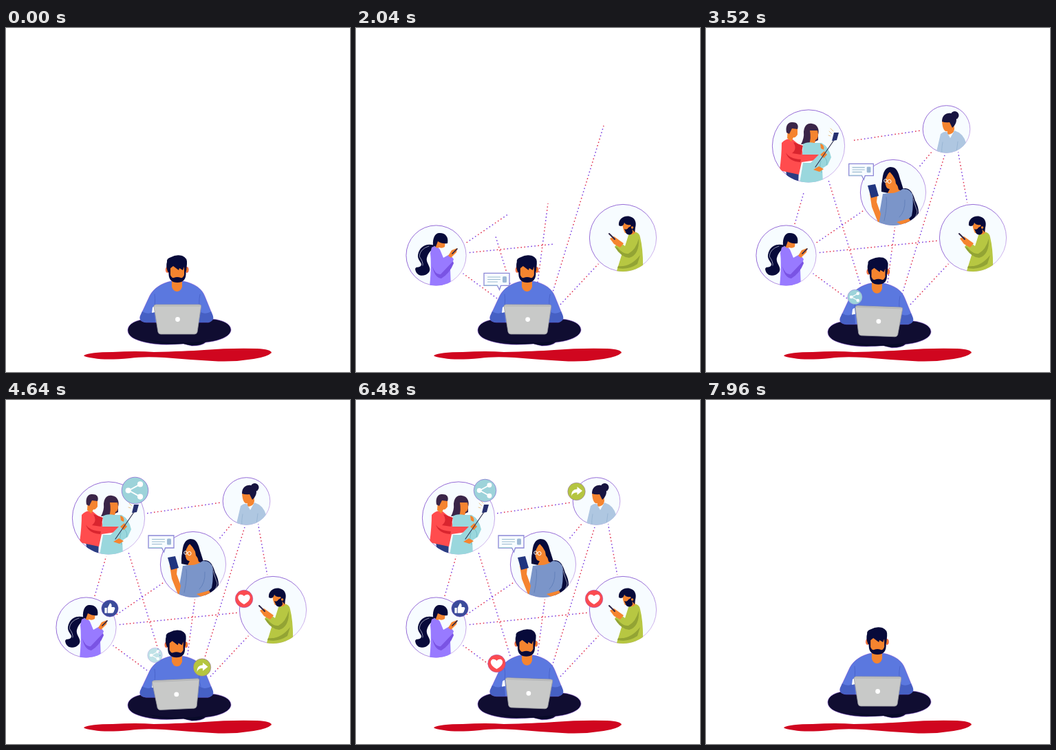
An HTML page that plays this animation: 500x500 px, repeating every 8 s.

```html
<!DOCTYPE html>
<html lang="en">
<head>
<meta charset="utf-8">
<title>Online community</title>
<style>
html, body { margin: 0; width: 100%; height: 100%; overflow: hidden; background: #fff; }
svg { display: block; width: 100vw; height: 100vh; }
</style>
</head>
<body>
<svg id="stage" viewBox="0 0 500 500" xmlns="http://www.w3.org/2000/svg"></svg>
<script>
const LOOP = 8000, OUT = 7600, OUT_END = 7900;
const NAVY = '#070a3a', SKIN = '#f5842f', EDGE = '#7b45cc';
const stage = document.getElementById('stage');

const fill = (d, color, extra = '') => `<path d="${d}" fill="${color}" ${extra}/>`;
const line = (d, color, width = 1) =>
  `<path d="${d}" fill="none" stroke="${color}" stroke-width="${width}" stroke-linecap="round" stroke-linejoin="round"/>`;
const rim = `stroke="${EDGE}" stroke-width=".5"`;

const ponytailWoman =
  fill('M114 316C103 312 92 317 90 330C89 338 98 342 94 346C91 349 88 346 86 350C87 361 99 363 106 355C111 348 101 342 103 334C105 327 109 323 113 320Z', NAVY) +
  line('M106 317Q93 321 92 332Q98 340 97 345', '#e8eefc', .6) +
  fill('M110 319Q117 315 122 322L127 334L136 329L142 336L137 350L138 376H107Q110 345 108 327Z', '#987aff') +
  fill('M111 346Q115 359 123 358L141 339L142 342Q136 357 124 364Q114 363 111 346Z', '#7a54e4') +
  fill('M117 308H130L129 318Q125 321 121 319Q116 321 115 317Z', SKIN) +
  fill('M112 316C111 304 116 297 122 298C130 298 135 304 133 313Q125 314 119 310L116 318Z', NAVY) +
  fill('M134 331L139 323L147 320L146 326L138 334Z', SKIN) +
  line('M140 328L147 321', '#2c2446', 1.7);

const hoodieMan =
  fill('M397 298Q411 293 413 304Q418 324 417 356H378Q383 340 387 327L376 318L382 310L391 317Z', '#b7c742') +
  fill('M411 306Q412 330 397 334Q385 333 376 318L380 319Q388 329 396 328Q407 322 411 306ZM381 346Q399 348 413 330L409 343Q396 352 380 349Z', '#93a434') +
  fill('M387 284L403 281L406 297Q402 303 397 298L391 298Q388 293 387 284Z', SKIN) +
  fill('M382 287C381 278 389 272 398 274C406 276 408 283 406 290L405 297L401 292L399 286Q393 287 390 283Q388 290 382 287Z', NAVY) +
  fill('M390 292Q394 294 396 290L401 287L402 297Q399 303 393 299Z', NAVY) +
  `<circle cx="401.500" cy="290" r="1.700" fill="${SKIN}"/>` +
  fill('M369 306L375 303L389 313L384 319L375 314Z', SKIN) +
  line('M368 299L376 307', '#2c2446', 2);

const selfieCouple =
  fill('M116 207H135L134 226H119Z', '#2b3d82') +
  fill('M110 167Q117 159 126 162L138 172L141 183L166 184L167 191L139 195L135 213L107 207Q110 184 110 167Z', '#ff4c4e') +
  fill('M127 166L141 171L138 184L125 182Q133 176 127 166ZM116 181Q121 190 138 191L137 195Q120 194 116 181Z', '#d9252f') +
  fill('M119 145L133 145L133 155Q130 160 127 159L124 165L118 160Z', SKIN) +
  fill('M117 152C115 141 120 136 126 137C133 137 135 142 133 147L125 146L121 154Z', '#3a2548') +
  fill('M138 169Q143 160 142 151C143 142 147 138 154 139C163 140 165 149 163 155L163 163L152 168Z', '#3a2548') +
  fill('M151 149L162 149Q165 160 159 163L158 168L150 169Q153 160 151 149Z', SKIN) +
  fill('M141 169Q146 165 157 167L168 167Q179 173 182 188L177 199L169 204L170 226H136L141 196H152L164 184L140 184Z', '#9ad7dd') +
  line('M167 193Q164 202 168 210M172 187Q178 194 175 199', '#75bdc6', 1) +
  fill('M166 168Q173 170 171 177L167 175ZM166 184L172 179L176 184L171 189ZM156 206L164 201L171 205L165 209Z', SKIN) +
  line('M159 202L186 163', '#343553', 1.2) +
  fill('M186 152L193 152L190 163L183 164Z', '#26306f') +
  line('M179 150L183 154M181 146L185 150M178 156L181 157', '#e3b36c', .8);

const phoneWoman =
  fill('M285 234C296 230 301 240 304 251C310 262 312 274 302 282L288 287Z', NAVY) +
  line('M299 240Q303 256 307 266Q307 273 301 278', '#f4f7ff', .6) +
  fill('M255 238C257 224 254 204 268 202C279 202 280 213 283 222L288 238L270 241Z', NAVY) +
  fill('M260 221Q262 211 268 209Q275 214 276 226L284 237Q275 243 264 240L267 234Q261 235 260 221Z', SKIN) +
  fill('M267 206Q279 212 280 224L288 238L280 235Q277 219 267 209Q261 215 260 227L262 238L255 237Q254 213 267 206Z', NAVY) +
  fill('M257 241Q264 240 269 240Q277 240 286 234Q297 233 300 243Q302 258 299 273L282 290H248Q253 265 257 241Z', '#7b95c9') +
  line('M262 246Q264 258 259 280M289 250Q290 266 281 275', '#607eb8', .9) +
  fill('M238 241L244 238L249 244L248 253L254 270L251 285L241 260ZM277 282L295 277L298 281L287 288Z', SKIN) +
  fill('M235 229L246 227L251 244L240 247Z', '#20357f') +
  `<g fill="none" stroke="#fff" stroke-width="1"><circle cx="261" cy="222" r="2.300"/><circle cx="266.500" cy="223" r="2.600"/></g>`;

const bunWoman =
  fill('M343 135L360 134L361 147Q360 155 350 155L351 150Q344 152 343 135Z', SKIN) +
  fill('M343 136C343 127 349 123 356 124C365 127 366 135 361 142L358 145L354 137Q348 138 343 136Z', '#171440') +
  `<circle cx="361.500" cy="127" r="6" fill="#171440"/>` +
  fill('M341 154Q346 150 350 151L355 160L361 149Q374 153 378 167L377 184H334Z', '#afc7e1') +
  line('M344 166Q342 177 343 182M366 165L364 181', '#94b1d1', .8);

// cx, cy, radius, pop start, drawing
const people = [
  [116.5, 330.5, 44, 480, ponytailWoman],
  [388, 305, 49, 1220, hoodieMan],
  [149, 171.5, 53, 2040, selfieCouple],
  [272, 239, 48, 2445, phoneWoman],
  [349.5, 147, 34.7, 2950, bunWoman]
];

// x1, y1, x2, y2, grow start, grow end
const links = [
  [205, 393, 130, 338, 120, 520],
  [297, 402, 385, 308, 860, 1240],
  [264, 370, 279, 255, 1200, 1450],
  [285, 387, 360, 142, 1240, 1760],
  [224, 372, 170, 195, 1078, 3462],
  [130, 330, 388, 304, 1640, 2300],
  [140, 326, 272, 236, 1700, 2250],
  [272, 247, 360, 142, 2050, 2500],
  [360, 142, 190, 167, 2433, 3705],
  [361, 150, 384, 278, 2900, 3300],
  [122, 309, 152, 205, 3300, 3630]
];

const disc = (color, glyph) =>
  `<circle r="12.8" fill="${color}" stroke="${EDGE}" stroke-width=".4"/>${glyph}`;
const icons = {
  thumb: disc('#3b4b9b', fill('M-8-1h3.5v8H-8ZM-3.5-1L0-8Q3.5-8 2.5-2H6.5Q8.500-1 7.500 1L5.500 6Q5 7 3 7H-3.500Z', '#fff')),
  heart: disc('#fb4b50', fill('M0 8C-16-1-6-11 0-4C6-11 16-1 0 8Z', '#fff')),
  share: disc('#9dd3da', line('M5-6L-6 0L5 6', '#fff', 1.3) +
    '<g fill="#fff"><circle cx="5" cy="-6" r="2.7"/><circle cx="-6.500" r="2.700"/><circle cx="5" cy="6" r="2.700"/></g>'),
  arrow: disc('#b5c540', fill('M1-7L8.500-1L1 5V1.500Q-5 1-7.500 6.500Q-8-3 1-3.500Z', '#fff')),
  bubble: fill('M-18.500-9H18.500V9H6L4 15L1 9H-18.500Z', '#f7fcff', 'stroke="#8b86d6" stroke-width="1.300"') +
    line('M-13-3.500H5M-13 0H5M-13 3.500H1', '#9bb9cf', 1.1) +
    '<rect x="8.500" y="-4.500" width="6" height="9" rx="1.500" fill="#9db8d6"/>' + line('M-18 8.500H1', '#9ccbd3', 1)
};

// kind, x, y, scale, pop start
const badges = [
  ['bubble', 225.5, 206, 1, 3325],
  ['thumb', 151, 303, .95, 3700],
  ['heart', 346, 289, 1, 4080],
  ['share', 187.5, 131.5, 1.28, 4400],
  ['arrow', 320.5, 133, 1, 5000]
];

// kind, x, start y, scale, rise start
const floats = [
  ['bubble', 204.5, 386, 1, 900],
  ['thumb', 290, 393.5, 1, 2050],
  ['share', 216.5, 394.5, .84, 3330],
  ['arrow', 285, 393, 1, 4400],
  ['heart', 204.5, 393.5, 1, 5900]
];
const LIFE = 1420;

const sleeve = 'M198 412Q207 418 216 411L217 428H204Q193 427 195 419Z';
const worker = `
<g id="worker">
  ${fill('M177 439C178 427 196 422 214 423H291C309 422 327 428 327 439C326 449 309 455 290 457Q285 462 270 462L258 459Q222 462 203 457C186 453 177 448 177 439Z', '#100d31', rim)}
  ${fill('M208 453Q250 461 288 455L284 459Q270 463 258 459Q226 461 208 453Z', '#080a29')}
  ${fill('M240 368Q249 372 257 368C274 371 285 379 289 390L300 417Q302 426 294 428H204Q193 427 195 419L209 389C215 378 226 371 240 368Z', '#5b78df', rim)}
  ${fill(sleeve, '#4660c4')}${fill(sleeve, '#4660c4', 'transform="matrix(-1 0 0 1 496 0)"')}
  ${line('M216 387Q218 401 214 412M282 387Q279 401 283 412', '#4963c9', .9)}
  ${fill('M213 406L216 404L217 413L212 414Z', '#fff')}
  ${fill('M241 364H256V376Q254 383 248.500 383Q243 383 241 376Z', SKIN)}
  <g id="head">
    <g fill="${SKIN}" stroke="#e43b46" stroke-width=".700"><ellipse cx="234.500" cy="351.500" rx="2.200" ry="4"/><ellipse cx="263" cy="351.500" rx="2.200" ry="4"/></g>
    ${fill('M236 344H261.500V358Q261 370 249 370Q237 370 236.500 358Z', NAVY)}
    ${fill('M239 345H259V359Q257 364 254 363Q249 361 244 363Q241 364 239 359Z', SKIN)}
    ${fill('M235 354Q232 346 234 340Q233 335 240 333Q247 329 256 331Q264 334 263 343L262 354L259 347L257 352L252 349L251 352L243 346L238 350L237 356Z', NAVY)}
  </g>
</g>
<g id="laptop">
  ${fill('M218 402H281Q284 402 283.500 405L278 442Q277 445 274 445H225Q222 445 221 442L215 405Q215 402 218 402Z', '#c8c9c8', 'stroke="#9b9ca2" stroke-width=".800"')}
  ${line('M217 404H282', '#b0b1b2', 1)}
  <circle cx="249.500" cy="423.500" r="3.400" fill="#fff"/>
</g>`;

// Dots in alternating runs of three, purple then red.
const dotRun = (color, shift) =>
  `<path fill="none" stroke="${color}" stroke-width="1.500" stroke-dasharray="1.6 3.4 1.6 3.4 1.6 18.4" stroke-dashoffset="${shift}"/>`;
const dots = dotRun('#7a3fe0', 0) + dotRun('#e0304e', -15);
const groups = (cls, items, draw) => items.map((it, i) => `<g class="${cls}">${draw(it, i)}</g>`).join('');

stage.innerHTML =
  `<linearGradient id="ring" x2="1" y2="1"><stop offset=".45" stop-color="${EDGE}"/><stop offset="1" stop-color="#e3c9f2"/></linearGradient>` +
  fill('M113 476Q122 471 155 471Q190 469 215 471Q260 470 288 468Q325 465 365 466Q385 467 386 472Q380 478 360 481Q330 486 300 484Q265 482 230 479Q200 477 180 480Q145 483 128 480Q113 478 113 476Z', '#d0061f') +
  groups('link', links, () => dots) +
  groups('person', people, ([x, y, r, , art], i) =>
    `<clipPath id="c${i}"><circle cx="${x}" cy="${y}" r="${r}"/></clipPath>
     <circle cx="${x}" cy="${y}" r="${r + 3}" fill="#fff"/>
     <circle cx="${x}" cy="${y}" r="${r - .4}" fill="#f7fcff" stroke="url(#ring)" stroke-width=".800"/>
     <g clip-path="url(#c${i})">${art}</g>`) +
  worker +
  groups('badge', badges, b => icons[b[0]]) +
  groups('float', floats, f => icons[f[0]]);

const all = cls => [...stage.querySelectorAll('.' + cls)];
const linkEls = all('link'), personEls = all('person'), badgeEls = all('badge'), floatEls = all('float');
const workerEl = document.getElementById('worker');
const headEl = document.getElementById('head');
const laptopEl = document.getElementById('laptop');

const clamp = v => Math.max(0, Math.min(1, v));
const span = (t, a, b) => clamp((t - a) / (b - a));

// Grows past full size, then settles.
function pop(dt) {
  if (dt < 240) return 1.18 * clamp(dt / 240);
  return 1 + .18 * (1 - span(dt, 240, 420));
}

function place(el, x, y, scale, originX = 0, originY = 0) {
  el.style.display = scale > .005 ? '' : 'none';
  el.setAttribute('transform', `translate(${x} ${y}) scale(${scale}) translate(${-originX} ${-originY})`);
}

function render(t) {
  const leave = 1 - span(t, OUT, OUT_END);

  links.forEach(([x1, y1, x2, y2, a, b], i) => {
    const k = span(t, a, b), el = linkEls[i];
    el.style.display = k > 0 && leave > 0 ? '' : 'none';
    el.style.opacity = leave;
    const d = `M${x1} ${y1}L${x1 + (x2 - x1) * k} ${y1 + (y2 - y1) * k}`;
    for (const p of el.children) p.setAttribute('d', d);
  });

  people.forEach(([x, y, , start], i) => place(personEls[i], x, y, pop(t - start) * leave, x, y));
  badges.forEach(([, x, y, s, start], i) => place(badgeEls[i], x, y, s * pop(t - start) * leave));

  floats.forEach(([, x, y, s, start], i) => {
    const dt = t - start, alive = dt >= 0 && dt < LIFE;
    place(floatEls[i], x, y - dt * .018, alive ? s * clamp(dt / 160) : 0);
    floatEls[i].style.opacity = 1 - span(dt, 1250, LIFE);
  });

  const wave = Math.sin(t * Math.PI / 2000);
  const bob = 6 * wave * wave;
  const sway = -1.5 * Math.sin(t * Math.PI / 1000);
  workerEl.setAttribute('transform', `translate(0 ${bob})`);
  headEl.setAttribute('transform', `translate(${sway} 0)`);
  laptopEl.setAttribute('transform', `translate(0 ${bob}) rotate(${-3.15 * wave} 249.5 460)`);
}

const begin = performance.now();
function tick() {
  render((performance.now() - begin) % LOOP);
  requestAnimationFrame(tick);
}
tick();
</script>
</body>
</html>
```
